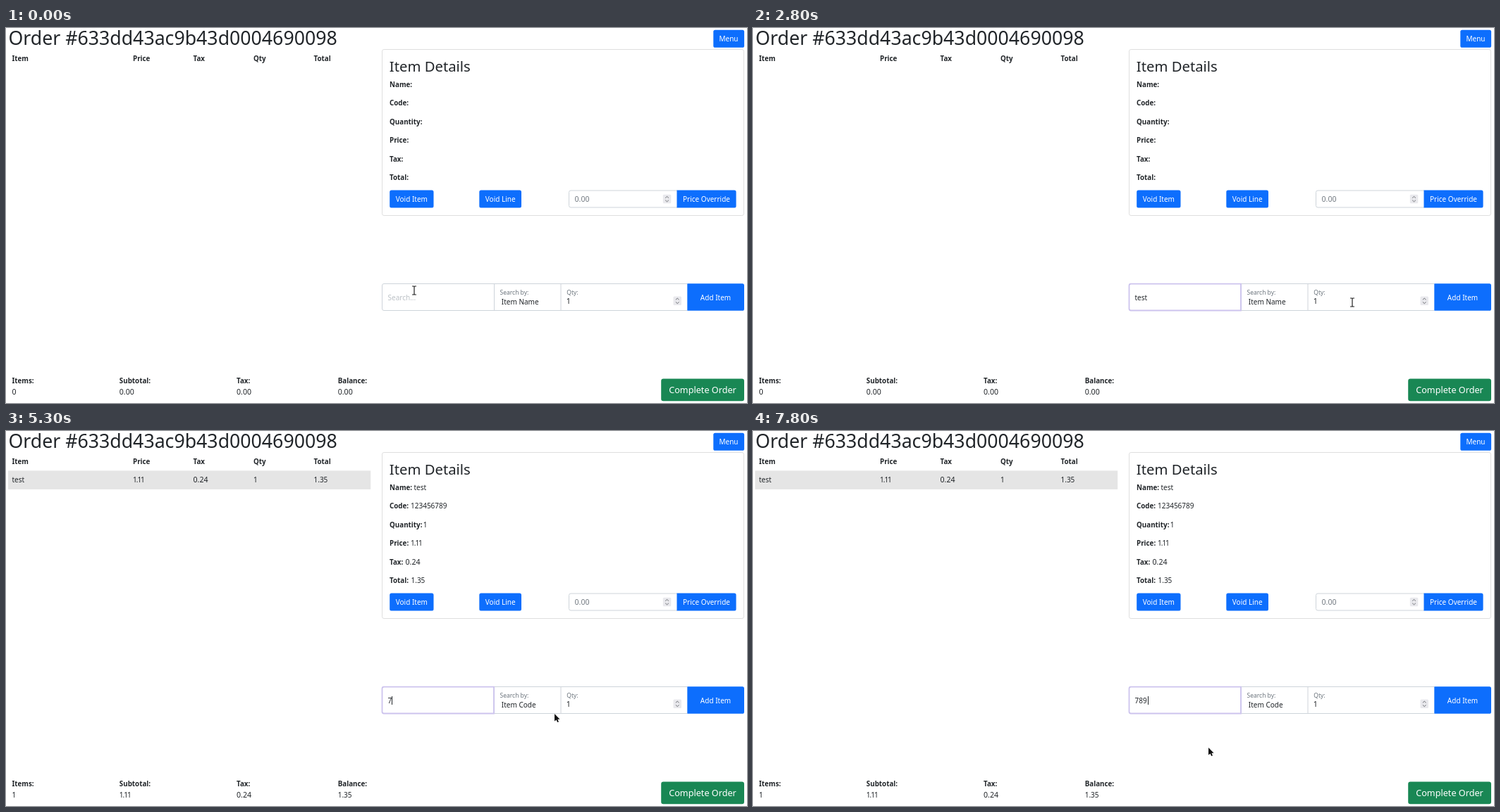
These frames come from a looping animation (1051 px wide and 533 px high, 8 s). An HTML page:

```html
<!DOCTYPE html>
<html lang="en">
<head>
<meta charset="utf-8">
<title>Order</title>
<style>
  html, body { margin: 0; width: 100%; height: 100%; overflow: hidden; background: #fff; }
  svg { display: block; width: 100%; height: 100%; }
  text { font: 10px "Noto Sans", "Open Sans", sans-serif; fill: #212529; white-space: pre; }
  .b { font-size: 9.8px; font-weight: 600; }
  .h1 { font-size: 26.7px; font-weight: 500; }
  .h2 { font-size: 20.3px; font-weight: 500; }
  .small { font-size: 8.5px; fill: #6c757d; }
  .num { font-size: 10.6px; }
  .ones { letter-spacing: -1px; }
  .mid { text-anchor: middle; fill: #fff; }
  .big { font-size: 12.65px; }
  .hint { fill: #bcc1c6; }
  .grey { fill: #757c83; }
  .btn { fill: #0d6efd; }
  .line { fill: none; stroke: #ced4da; }
  .caret { stroke: #212529; }
</style>
</head>
<body>
<svg viewBox="0 0 1051 533">
  <defs>
    <g id="spin">
      <rect width="11.5" height="12.5" rx="1.5" fill="#e9e9ed"/>
      <path d="M3.4 4.8 5.75 2.6 8.1 4.8M3.4 7.9 5.75 10.1 8.1 7.9" fill="none" stroke="#5f6268" stroke-width=".9"/>
    </g>
  </defs>

  <text class="h1" x="3.5" y="24">Order #633dd43ac9b43d0004690098</text>
  <g id="head"></g>

  <rect class="btn" x="1003.3" y="2.7" width="43.8" height="25.1" rx="2.6"/>
  <text class="mid" x="1025" y="19.2">Menu</text>

  <rect x="533.5" y="30.5" width="513" height="236" rx="2.6" fill="none" stroke="#dfdfdf"/>
  <text class="h2" x="543.8" y="62.3">Item Details</text>
  <g id="labels"></g>

  <rect class="btn" x="544.2" y="230.5" width="62.3" height="25.1" rx="2.6"/>
  <text class="mid" x="575.3" y="246.8">Void Item</text>
  <rect class="btn" x="671.3" y="230.5" width="59.7" height="25.1" rx="2.6"/>
  <text class="mid" x="701.2" y="246.8">Void Line</text>
  <path class="line" d="M952 231H801Q798.5 231 798.5 233.5V252.5Q798.5 255 801 255H952"/>
  <text class="num grey" x="806.5" y="247">0.00</text>
  <use href="#spin" x="931.8" y="236.8"/>
  <path class="btn" d="M951.5 230.5H1033Q1035.6 230.5 1035.6 233.1V253Q1035.6 255.6 1033 255.6H951.5Z"/>
  <text class="mid" x="993.5" y="246.8">Price Override</text>

  <path class="line" d="M966 363.5H536Q533.5 363.5 533.5 366V399Q533.5 401.5 536 401.5H966M692.5 363.5V401.5M787 363.5V401.5"/>
  <text class="small" x="700.5" y="378.6">Search by:</text>
  <text id="mode" x="702.8" y="393.4"></text>
  <text class="small" x="795.3" y="378.6">Qty:</text>
  <text class="num" x="794.8" y="391.8">1</text>
  <use href="#spin" x="946.5" y="381.5"/>

  <path id="ring" d="M965.2 362.2H1045Q1048.2 362.2 1048.2 365.4V399.8Q1048.2 403 1045 403H965.2Z" fill="none" stroke="#86b6fe" stroke-width="2.4"/>
  <path id="add" d="M966.3 363.3H1044.4Q1047 363.3 1047 365.9V399.2Q1047 401.8 1044.4 401.8H966.3Z"/>
  <text class="mid" x="1006.5" y="386.6">Add Item</text>

  <path id="focus" d="M692 363.7H536Q533.5 363.7 533.5 366.2V399Q533.5 401.5 536 401.5H692Z" fill="none" stroke="#cdc4ee" stroke-width="1.8"/>
  <text id="query" x="541.5" y="386.6"></text>
  <path id="caret" class="caret" d="M0 377V389"/>

  <g id="sums"></g>
  <rect x="929.2" y="498.6" width="117.8" height="31.7" rx="3.2" fill="#198754"/>
  <text class="mid big" x="988" y="519">Complete Order</text>

  <g id="result">
    <rect x="3" y="56.4" width="514.2" height="26.5" fill="#e5e5e5"/>
  </g>

  <g id="menu">
    <rect id="shade" x="532.5" y="407" width="161" rx="3" fill="#000" opacity=".05"/>
    <rect id="panel" x="533" y="407.5" width="159.5" rx="2.6" fill="#fff" stroke="#dcdcdc"/>
    <rect id="hover" x="539" width="148" height="26.5" fill="#eceaf4"/>
    <text id="m0" x="541" y="429.6"></text>
    <text id="m1" x="541" y="456.1"></text>
    <text id="m2" x="541" y="482.6"></text>
    <text id="m3" x="541" y="509.1"></text>
  </g>

  <g id="status">
    <path d="M-1 521.5H208Q210.3 521.5 210.3 524V534H-1Z" fill="#f1f1f1" stroke="#c4c4c4"/>
    <text x="-2" y="533" style="font-size:9.2px">Read cdn.jsdelivr.net</text>
  </g>

  <g id="cursor">
    <path id="beam" d="M-3-6H-1Q0-6 0-5Q0-6 1-6H3M-3 6H-1Q0 6 0 5Q0 6 1 6H3M0-5V5" fill="none" stroke="#222" stroke-width="1.2"/>
    <path id="arrow" d="M0 0V10.6L2.5 8.4 4.2 12 6 11.2 4.4 7.7H7.6Z" fill="#111" stroke="#fff" stroke-width="1" paint-order="stroke"/>
    <path id="hand" d="M-1.2.8Q0-.6 1.2.8V4L5.2 4.8Q6.4 5.2 6.2 6.6L5.4 10.5H-.8L-3.6 7Q-3.6 5.4-1.2 6.6Z" fill="#000" stroke="#fff" stroke-width="1" paint-order="stroke"/>
  </g>
</svg>
<script>
const LOOP = 8000, STEP = 100, ROW = 26.5;
const $ = id => document.getElementById(id);

function put(parent, x, y, str, cls = "") {
  const el = document.createElementNS("http://www.w3.org/2000/svg", "text");
  el.setAttribute("x", x);
  el.setAttribute("y", y);
  el.setAttribute("class", cls);
  el.textContent = str;
  $(parent).append(el);
  return el;
}
const numClass = s => s === "1.11" ? "ones" : s[0] === "0" ? "num" : "";

// Table columns: label, x, value
[["Item", 8.5, "test"], ["Price", 180, "1.11"], ["Tax", 265.5, "0.24"], ["Qty", 351, "1"], ["Total", 436.5, "1.35"]]
  .forEach(([name, x, val]) => {
    put("head", x, 47, name, "b");
    put("result", x, 73.4, val, numClass(val));
  });

// Detail lines: label, x of value, value
[["Name:", 578.5, "test"], ["Code:", 574, "123456789"], ["Quantity:", 591.7, "1"],
 ["Price:", 574, "1.11"], ["Tax:", 566.5, "0.24"], ["Total:", 574.5, "1.35"]]
  .forEach(([name, x, val], i) => {
    const y = 83.5 + ROW * i;
    put("labels", 544, y, name, "b");
    put("result", x, y, val, numClass(val));
  });

// Totals: label, x, value after the item is added
const sums = [["Items:", 8.5, "1"], ["Subtotal:", 160.8, "1.11"], ["Tax:", 327, "0.24"], ["Balance:", 470.7, "1.35"]]
  .map(([name, x, val], i) => {
    put("sums", x, 505.4, name, "b");
    return { el: put("sums", x, 521, ""), before: i ? "0.00" : "0", after: val };
  });

// Pointer: start, duration, x, y, shape
const moves = [
  [0, 0, 579, 373, "beam"], [900, 0, 579, 377, ""], [1200, 0, 579, 377, "beam"],
  [1300, 0, 588, 402, "arrow"], [1400, 0, 595, 420, "hand"], [1500, 0, 597, 425, "hand"],
  [1700, 0, 596, 425, "arrow"], [1800, 600, 790, 390, "arrow"],
  [2500, 800, 950, 390, "beam"], [3400, 0, 969, 391, "arrow"],
  [3500, 0, 980.5, 387.5, "hand"], [3500, 200, 970, 391, "hand"], [4000, 0, 967.5, 391.5, "hand"],
  [4500, 200, 778, 402, "arrow"], [5300, 400, 680, 424, "arrow"], [5700, 0, 672, 426, "hand"],
  [5800, 0, 658, 427, "hand"], [5900, 200, 650, 429.5, "hand"],
  [6600, 400, 646, 451, "hand"], [7800, 0, 646, 450, "arrow"]
];

// Search field: start, text, caret x
const typing = [
  [0, "", 542], [600, "t", 546], [900, "tes", 556.5], [1000, "test", 560.5],
  [4400, "", 542], [5300, "7", 547.5], [7800, "789", 560.5]
];

const byName = ["test - Code: 123456789", "test2 - Code: 456", "test3 - Code: 789", "test4 - Code: 777"].map(s => "Name: " + s);
const byCode = ["123456789 - Name: test", "789 - Name: test3", "777 - Name: test4"].map(s => "Code: " + s);

const show = (id, on) => $(id).setAttribute("visibility", on ? "visible" : "hidden");
const within = (t, ...spans) => spans.some(([a, b]) => t >= a && t < b);

function drawCursor(t) {
  let x = 0, y = 0, shape = "";
  for (const [start, dur, tx, ty, kind] of moves) {
    if (t < start) break;
    const p = dur ? Math.min(1, (t - start) / dur) : 1;
    x += (tx - x) * p;
    y += (ty - y) * p;
    shape = kind;
  }
  $("cursor").setAttribute("transform", `translate(${x} ${y})`);
  for (const id of ["beam", "arrow", "hand"]) show(id, id === shape);
}

// Visibility is set on each part, since a visible child shows inside a hidden group
function drawMenu(t) {
  show("menu", within(t, [700, 1700], [5400, 7800]));
  const list = t < 4000 ? byName : byCode;
  const height = 10.5 + ROW * list.length;
  $("panel").setAttribute("height", height);
  $("shade").setAttribute("height", height + 2.5);
  for (let i = 0; i < 4; i++) $("m" + i).textContent = list[i] || "";
  $("hover").setAttribute("y", t >= 6800 ? 412.8 + ROW : 412.8);
  show("hover", within(t, [1400, 1700], [5700, 7800]));
}

function drawSearch(t) {
  const [, str, x] = typing.filter(k => k[0] <= t).pop();
  $("query").textContent = str || "Search...";
  $("query").setAttribute("class", str ? "" : "hint");
  $("caret").setAttribute("transform", `translate(${x} 0)`);
  show("caret", within(t, [300, 2600], [4700, 5800], [6700, 7000], [7800, LOOP]));
  show("focus", within(t, [200, 4000], [4700, LOOP]));
  $("focus").setAttribute("opacity", within(t, [200, 300]) ? .5 : 1);
  $("mode").textContent = t < 4700 ? "Item Name" : "Item Code";
}

function draw(now) {
  const t = Math.floor(now % LOOP / STEP) * STEP;
  const added = t >= 4400;
  drawCursor(t);
  drawMenu(t);
  drawSearch(t);
  show("result", added);
  for (const { el, before, after } of sums) {
    const val = added ? after : before;
    el.textContent = val;
    el.setAttribute("class", numClass(val));
  }
  show("status", within(t, [4200, 4500]));
  show("ring", within(t, [4000, 4600]));
  $("add").setAttribute("fill", within(t, [3500, 4600]) ? "#0b5ed7" : "#0d6efd");
}

let begin;
function tick(now) {
  begin ??= now;
  draw(now - begin);
  requestAnimationFrame(tick);
}
draw(0);
requestAnimationFrame(tick);
</script>
</body>
</html>
```
